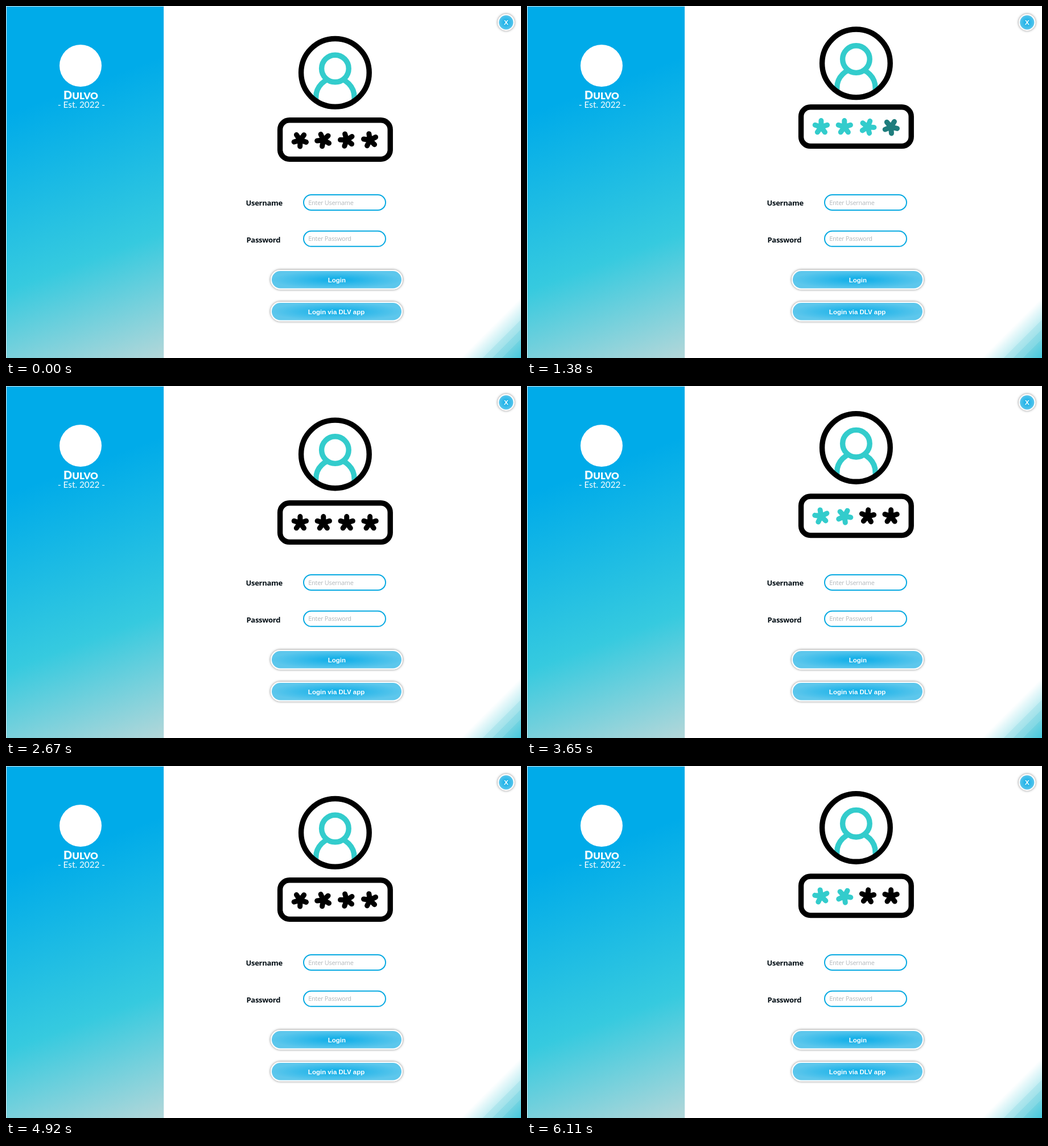
These frames come from a looping animation (905 px wide and 619 px high, 6.18 s). An HTML page:

```html
<!DOCTYPE html>
<html lang="en">
<head>
<meta charset="utf-8">
<title>Login</title>
<style>
  html, body { margin: 0; width: 100%; height: 100%; overflow: hidden; background: #fff; }
  svg { display: block; width: 100vw; height: 100vh; }
  .ui { font-family: "Open Sans", "Noto Sans", sans-serif; letter-spacing: -.3px; }
  .label { font-size: 13px; font-weight: 700; fill: #020d14; }
  .hint { font-size: 11px; fill: #b3b8bb; }
  .btn { font: 700 11.5px "Liberation Sans", Arial, sans-serif; fill: #fff; text-anchor: middle; }
  .brand { font-family: Lato, sans-serif; fill: #fff; text-anchor: middle; }
  .field { fill: #fff; stroke: #08aae2; stroke-width: 2; }
  .ring { stroke: #fff; stroke-width: 2; filter: url(#shade); }
  .ink { fill: none; stroke: #000; stroke-width: 9.4; }
  .teal { fill: none; stroke: #33cccc; stroke-width: 9.4; }
  .star { fill: none; stroke-width: 9; stroke-linecap: round; }
</style>
</head>
<body>
<svg viewBox="0 0 905 619" preserveAspectRatio="none">
  <defs>
    <linearGradient id="sea" gradientUnits="userSpaceOnUse" x1="30" y1="10" x2="260" y2="630">
      <stop offset=".24" stop-color="#00abe9"/>
      <stop offset=".68" stop-color="#36cadf"/>
      <stop offset="1" stop-color="#b6d7d9"/>
    </linearGradient>
    <linearGradient id="corner" gradientUnits="userSpaceOnUse" x1="852" y1="566" x2="905" y2="619">
      <stop offset="0" stop-color="#fff"/>
      <stop offset=".36" stop-color="#c4eef3"/>
      <stop offset=".36" stop-color="#b2e7ee"/>
      <stop offset=".52" stop-color="#a2e2ea"/>
      <stop offset=".52" stop-color="#90dce7"/>
      <stop offset=".68" stop-color="#82d8e4"/>
      <stop offset=".68" stop-color="#72d3e1"/>
      <stop offset="1" stop-color="#45c8dc"/>
    </linearGradient>
    <radialGradient id="glow">
      <stop offset="0" stop-color="#0badE8"/>
      <stop offset="1" stop-color="#5dc7ec"/>
    </radialGradient>
    <filter id="shade" x="-30%" y="-30%" width="160%" height="160%">
      <feDropShadow dx="0" dy="0" stdDeviation="2.2" flood-color="#000" flood-opacity=".55"/>
    </filter>
  </defs>

  <rect width="277.5" height="619" fill="#d5edf6"/>
  <rect x="1" y="1" width="276" height="618" fill="url(#sea)"/>
  <circle cx="131" cy="105" r="37" fill="#fff"/>
  <text class="brand" x="131.5" y="163.5" font-weight="900"><tspan font-size="20">D</tspan><tspan font-size="17">ULVO</tspan></text>
  <text class="brand" x="132.5" y="178.5" font-size="15.3">- Est. 2022 -</text>

  <path d="M799 619 905 513V619Z" fill="url(#corner)"/>

  <circle class="ring" cx="878.8" cy="28.8" r="13.6" fill="url(#glow)"/>
  <text class="btn" x="878.8" y="33">X</text>

  <g id="user">
    <circle r="60" fill="#fff"/>
    <path class="teal" d="M-33.7 50V43A33.7 33.7 0 0 1 33.7 43V50"/>
    <circle class="teal" cy="-7.3" r="23.8" style="fill:#fff"/>
    <circle class="ink" r="59.8"/>
  </g>
  <g id="card">
    <rect class="ink" x="-96.8" y="-34.3" width="193.6" height="68.6" rx="16.5"/>
  </g>

  <g class="ui">
    <text class="label" x="421.5" y="351">Username</text>
    <text class="label" x="422.5" y="415.5">Password</text>
    <rect class="field" x="523" y="332" width="144" height="27" rx="13.5"/>
    <rect class="field" x="523" y="395.8" width="144" height="27" rx="13.5"/>
    <text class="hint" x="531.3" y="349.5">Enter Username</text>
    <text class="hint" x="531.3" y="413.3">Enter Password</text>
  </g>

  <rect class="ring" x="466" y="465" width="230" height="32.5" rx="16.2" fill="url(#glow)"/>
  <rect class="ring" x="466" y="521" width="230" height="32.5" rx="16.2" fill="url(#glow)"/>
  <text class="btn" x="581.3" y="486">Login</text>
  <text class="btn" x="580.6" y="542">Login via DLV app</text>
</svg>
<script>
const LOOP = 6180, CYCLE = 2460, REST = 600;
const CX = 578.4;
const user = document.getElementById('user');
const card = document.getElementById('card');

// Lift amount over one cycle, as [ms, 0..1]
const userLift = [[790, 0], [990, .1], [1190, .6], [1320, .95], [1460, 1],
  [1860, 1], [2000, .99], [2340, .3], [2460, .16], [2670, .03], [2950, 0]];
const cardLift = [[790, 0], [990, .067], [1190, .42], [1320, .9], [1460, 1],
  [1860, 1], [2000, .99], [2340, .35], [2460, .2], [2670, .03], [2950, 0]];

const clamp = x => Math.min(1, Math.max(0, x));
const ease = x => (1 - Math.cos(Math.PI * x)) / 2;

function makeStar() {
  let d = '';
  for (let k = 0; k < 5; k++) {
    const a = k * Math.PI * 2 / 5;
    d += `M0 0L${11.2 * Math.sin(a)} ${-11.2 * Math.cos(a)}`;
  }
  const el = document.createElementNS('http://www.w3.org/2000/svg', 'path');
  el.setAttribute('class', 'star');
  el.setAttribute('d', d);
  card.append(el);
  return el;
}
const stars = [0, 1, 2, 3].map(makeStar);

// Smooth monotone curve through the points
function curve(pts, t) {
  const last = pts.length - 1;
  if (t <= pts[0][0]) return pts[0][1];
  if (t >= pts[last][0]) return pts[last][1];
  const i = pts.findIndex(p => p[0] > t) - 1;
  const slope = k => k < 0 || k >= last ? 0
    : (pts[k + 1][1] - pts[k][1]) / (pts[k + 1][0] - pts[k][0]);
  const tangent = k => {
    const a = slope(k - 1), b = slope(k);
    return a * b > 0 ? 2 * a * b / (a + b) : 0;
  };
  const [t0, v0] = pts[i], [t1, v1] = pts[i + 1];
  const h = t1 - t0, u = (t - t0) / h, w = 1 - u;
  return v0 * (1 + 2 * u) * w * w + h * tangent(i) * u * w * w
    + v1 * u * u * (3 - 2 * u) - h * tangent(i + 1) * u * u * w;
}

function draw(now) {
  let t = now % LOOP % CYCLE;
  if (t < REST) t += CYCLE;
  user.setAttribute('transform', `translate(${CX} ${120.5 - 20 * curve(userLift, t)})`);
  card.setAttribute('transform', `translate(${CX} ${241 - 30 * curve(cardLift, t)})`);
  stars.forEach((star, i) => {
    const on = clamp((t - 868 - 148 * i) / 360);
    const off = clamp((t - 2030 + 18 * i) / 540);
    const turn = 360 * (ease(on) + ease(off));
    const tint = clamp((on - .1) / .15) - clamp((off - .1) / .2);
    star.setAttribute('transform', `translate(${-61.5 + 40.9 * i} .7) rotate(${turn})`);
    star.setAttribute('stroke', `rgb(${51 * tint},${204 * tint},${204 * tint})`);
  });
}

const start = performance.now();
function tick() {
  draw(performance.now() - start);
  requestAnimationFrame(tick);
}
tick();
</script>
</body>
</html>
```
